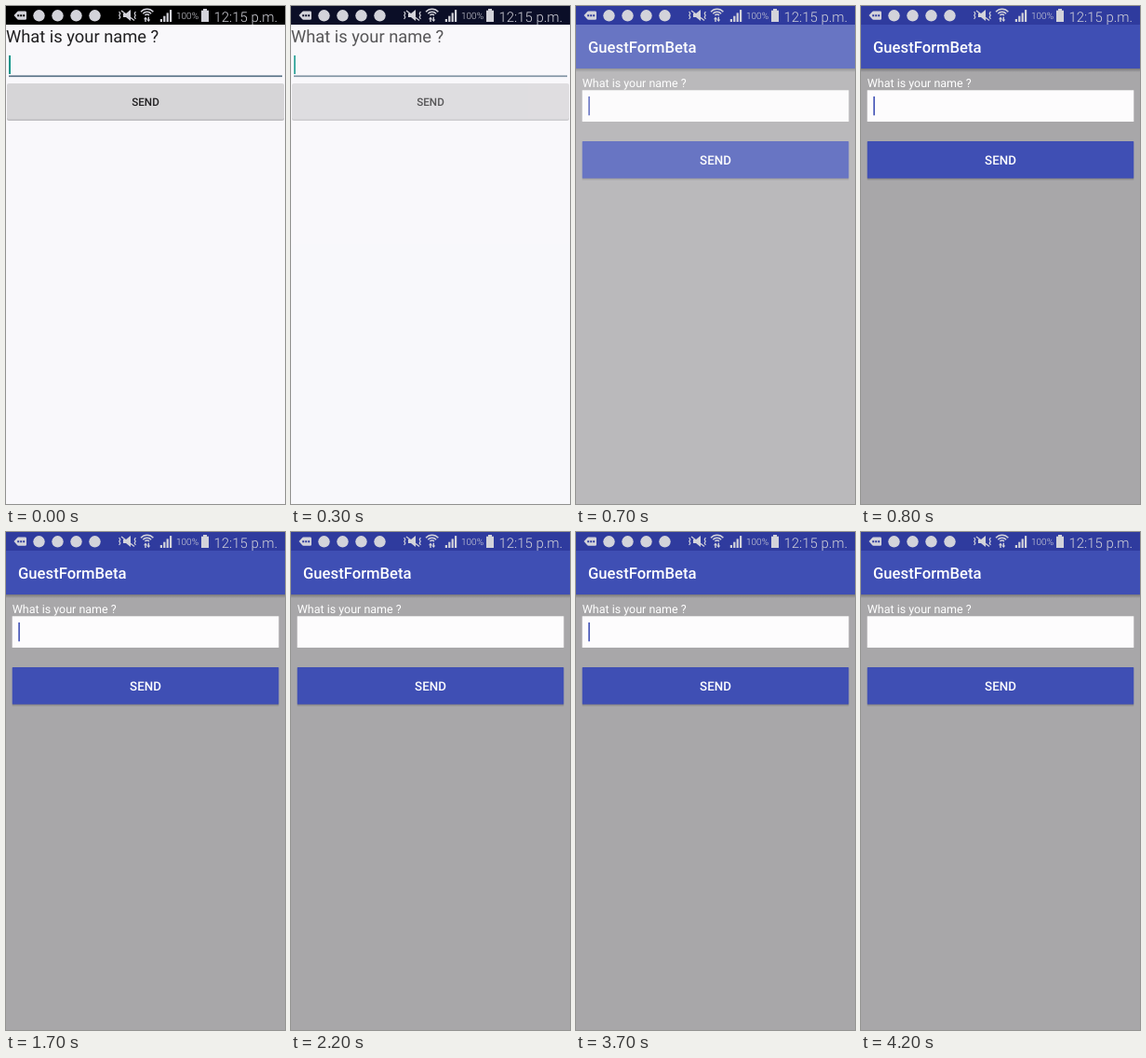
Animation, 300 px wide and 534 px high, one loop 4.7 s. Source, as an HTML page:

```html
<!DOCTYPE html>
<html lang="en">
<head>
<meta charset="utf-8">
<title>Name form</title>
<style>
  html, body { margin: 0; width: 100%; height: 100%; overflow: hidden; background: #f9f8fb; }
  svg { display: block; width: 100%; height: 100%; }
  text { font-family: Roboto, "Open Sans", sans-serif; text-rendering: geometricPrecision; }
  .medium { font-weight: 500; }
  .light { font-weight: 300; }
  .mid { text-anchor: middle; }
</style>
</head>
<body>
<svg viewBox="0 0 300 534" preserveAspectRatio="none">
  <defs>
    <linearGradient id="shade" x2="0" y2="1">
      <stop offset="0" stop-color="#000" stop-opacity=".28"/>
      <stop offset="1" stop-color="#000" stop-opacity="0"/>
    </linearGradient>
  </defs>

  <rect width="300" height="534" fill="#f9f8fb"/>
  <rect width="300" height="20" fill="#2f3b9e"/>

  <g id="plain">
    <rect width="300" height="534" fill="#f9f8fb"/>
    <rect width="300" height="20" fill="#000"/>
    <text x="0" y="39.4" font-size="18.33" fill="#212022">What is your name ?</text>
    <rect x="3" y="53" width="2" height="20" fill="#0b9488"/>
    <rect x="3" y="74.4" width="294" height="1.7" fill="#5b7488"/>
    <rect x="1" y="84" width="298" height="39" rx="2" fill="#bdbcbf"/>
    <rect x="1" y="83" width="298" height="38.6" rx="2" fill="#d6d5d7"/>
    <text class="medium mid" x="150" y="106.7" font-size="11.67" fill="#212022">SEND</text>
  </g>

  <g id="styled">
    <rect y="20" width="300" height="514" fill="#a8a7a9"/>
    <rect y="67" width="300" height="4" fill="url(#shade)"/>
    <rect y="20" width="300" height="47" fill="#3f4fb4"/>
    <text class="medium" x="13" y="49.8" font-size="16.67" fill="#fff">GuestFormBeta</text>
    <text x="6.7" y="86.8" font-size="12.5" fill="#fff">What is your name ?</text>
    <rect x="6.7" y="90.3" width="286.6" height="33.7" fill="#fdfcfd"/>
    <rect id="caret" x="13.3" y="97" width="1.6" height="20.3" fill="#3f4fb4"/>
    <rect x="6.7" y="184" width="286.6" height="3.5" fill="url(#shade)"/>
    <rect x="6.7" y="145" width="286.6" height="39.8" rx=".8" fill="#3f4fb4"/>
    <text class="medium mid" x="150" y="170" font-size="13.33" fill="#fff">SEND</text>
  </g>

  <g id="status" fill="#d3d3da" stroke="#d3d3da" stroke-width="0">
    <path fill-rule="evenodd" d="M8.5 10L12 6.2Q12.5 5.6 13.4 5.6H20.6Q22 5.6 22 7V13.4Q22 14.8 20.6 14.8H13.4Q12.5 14.8 12 14.1Z
      M12.2 9.2v2h2v-2zM15.2 9.2v2h2v-2zM18.2 9.2v2h2v-2z"/>
    <g id="notes"></g>
    <path d="M126 8h3l5-4v12l-5-4h-3z"/>
    <path fill="none" stroke-width="1.2" d="M124 5L138 15.5M121.6 6l1.2 2-1 2 1 2-1.2 2M139.4 6l-1.2 2 1 2-1 2 1.2 2"/>
    <g id="wifi" fill="none" stroke-width="1.5"></g>
    <path d="M148 14.2l2-2.6 2 2.6h-1.3v2.8h-1.4v-2.8zM151.3 14.4h1.3v-2.6h1.4v2.6h1.3l-2 2.6z"/>
    <g id="signal"></g>
    <text class="light" x="183" y="14" font-size="10">100%</text>
    <path d="M212 3h4v1.8h2V17h-8V4.8h2z"/>
    <text class="light" x="223.6" y="16.5" font-size="14.9">12:15 p.m.</text>
  </g>
</svg>
<script>
  const LOOP = 4700;
  const get = id => document.getElementById(id);

  function add(parent, tag, attrs) {
    const el = document.createElementNS("http://www.w3.org/2000/svg", tag);
    for (const key in attrs) el.setAttribute(key, attrs[key]);
    get(parent).append(el);
  }

  for (let i = 0; i < 4; i++) {
    add("notes", "circle", { cx: 35.5 + 20 * i, cy: 10.3, r: 6.2 });
    const height = 3 + 3.3 * i;
    add("signal", "rect", { x: 165.8 + 3.4 * i, y: 17 - height, width: 2.2, height });
  }
  for (const r of [3, 5.8, 8.8]) {
    const dx = r * 0.76, y = 12 - r * 0.65;
    add("wifi", "path", { d: `M${151.7 - dx} ${y}A${r} ${r} 0 0 1 ${151.7 + dx} ${y}` });
  }

  // Each step is [start in ms, opacity], held until the next one.
  function hold(id, steps) {
    const frames = steps.map(([time, opacity]) =>
      ({ offset: time / LOOP, opacity, easing: "steps(1, end)" }));
    frames.push({ offset: 1, opacity: steps.at(-1)[1] });
    return get(id).animate(frames, { duration: LOOP, iterations: Infinity });
  }

  const blink = [[0, 1]];
  for (let t = 1200, on = 0; t < LOOP; t += 500, on = 1 - on) blink.push([t, on]);

  const runs = [
    hold("plain", [[0, 1], [300, 0.75], [400, 0.5], [500, 0.25], [600, 0]]),
    hold("styled", [[0, 0], [700, 0.78], [800, 1]]),
    hold("caret", blink)
  ];
  const start = document.timeline.currentTime;
  runs.forEach(run => { run.startTime = start; });
</script>
</body>
</html>
```
